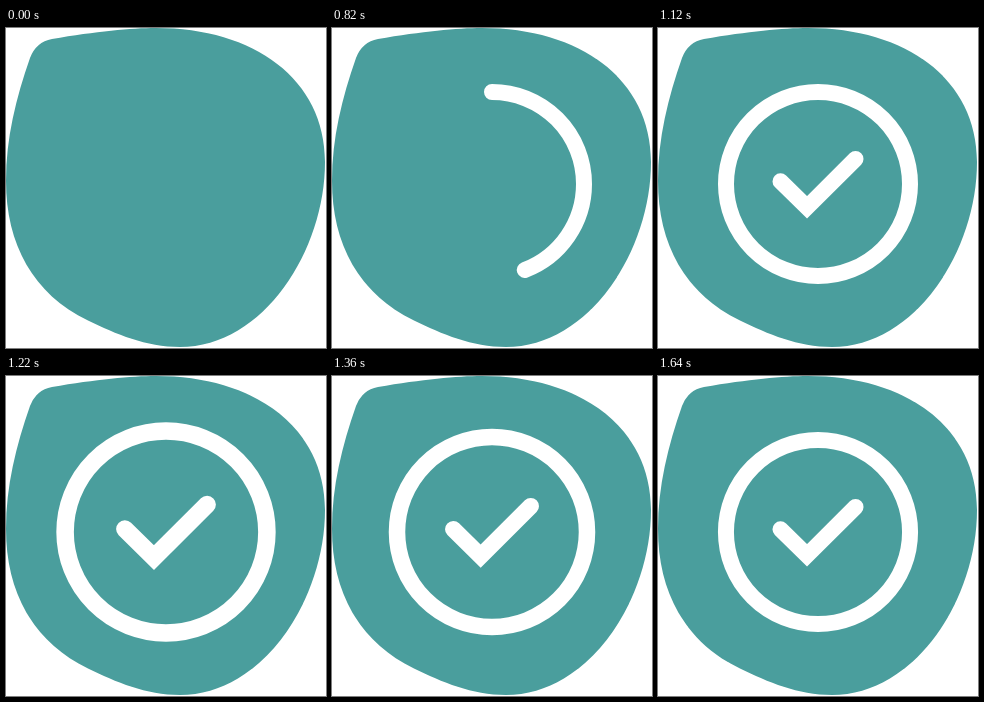
Animation, 320 px wide and 320 px high, one loop 1.8 s. Source, as an HTML page:

```html
<!DOCTYPE html>
<html>
<head>
<meta charset="utf-8">
<style>
html, body { margin: 0; width: 100%; height: 100%; overflow: hidden; background: #fff; }
svg { display: block; width: 100vw; height: 100vh; }
</style>
</head>
<body>
<svg viewBox="0 0 320 320">
  <path fill="#4a9e9d" d="M24 30Q30 14 46 11C90 3.500 125 0 150 0C248 0 319 51 319 134C319 222 258 319 174 319C140 319 110 306 82 292.500C27 266 0 216 0 153C0 110 10 70 24 30Z"/>
  <g id="badge" fill="none" stroke="#fff" stroke-width="16" stroke-linecap="round">
    <path id="ring" pathLength="1" d="M160 64a92 92 0 0 1 0 184a92 92 0 0 1 0 -184"/>
    <path id="check" pathLength="1" d="M122.500 153.300L149 179.300L197.500 131"/>
  </g>
</svg>
<script>
const LOOP = 1800, PEAK = 1232;
const [badge, ring, check] = ["badge", "ring", "check"].map(id => document.getElementById(id));
const progress = (t, from, to) => Math.min(1, Math.max(0, (t - from) / (to - from)));

function draw(path, p) {
  path.style.visibility = p > 0 ? "visible" : "hidden";
  path.setAttribute("stroke-dasharray", p < 1 ? `${p} 2` : "none");
}

// Quick swell, then a critically damped return to rest.
function swell(t) {
  if (t < PEAK) {
    const p = progress(t, 1130, PEAK);
    return p * p * (3 - 2 * p);
  }
  const a = (t - PEAK) * 0.018;
  return (1 + a) * Math.exp(-a);
}

function render(now) {
  const t = now % LOOP;
  draw(ring, progress(t, 600, 1100));
  draw(check, progress(t, 870, 1120));
  const scale = 1 + 0.1 * swell(t);
  badge.setAttribute("transform", `translate(160 156) scale(${scale}) translate(-160 -156)`);
}

function tick() {
  render(performance.now());
  requestAnimationFrame(tick);
}
tick();
</script>
</body>
</html>
```
